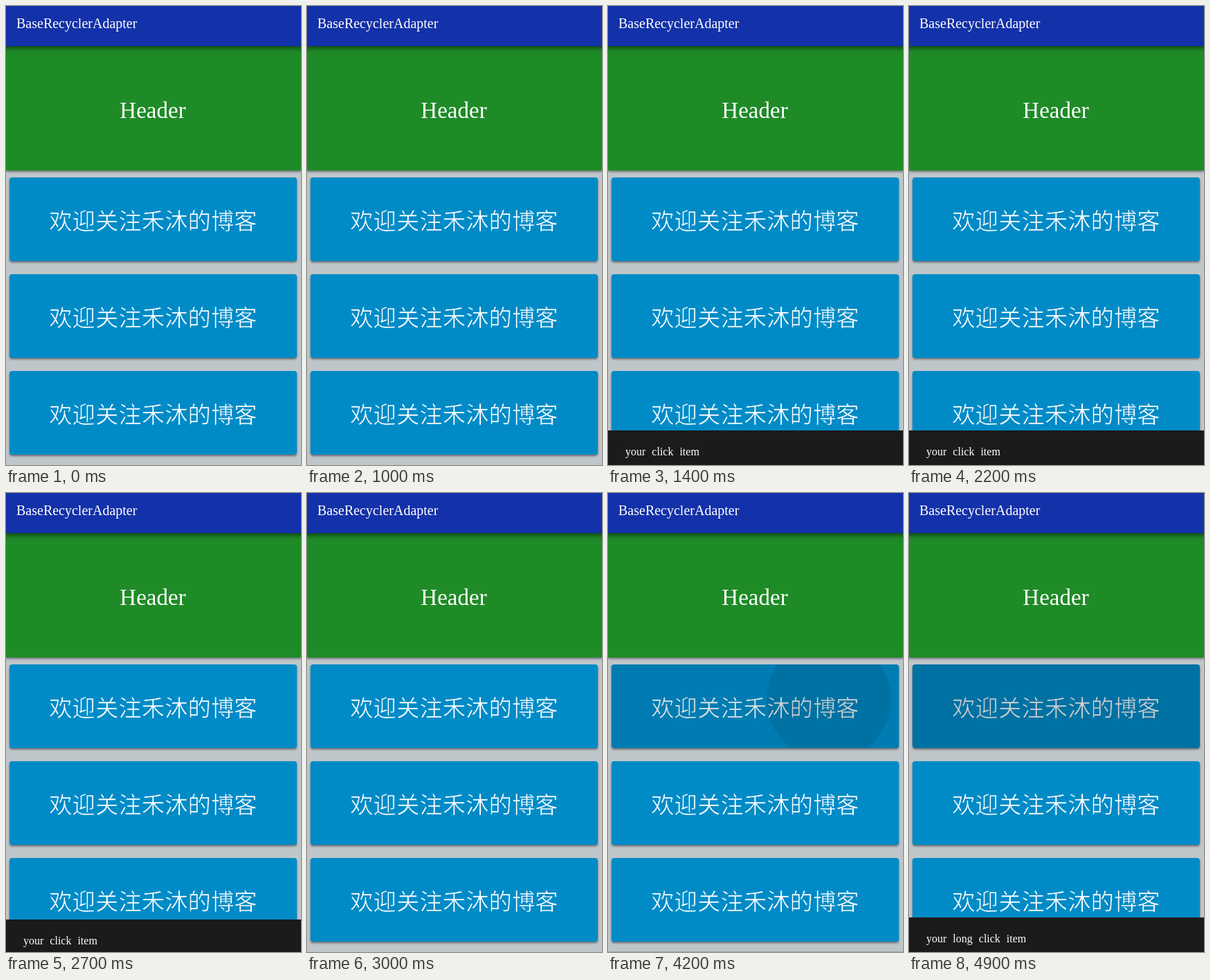
Animation of 426x664 px, one loop 5100 ms. Source, as an HTML page:

```html
<!DOCTYPE html>
<html lang="zh">
<head>
<meta charset="utf-8">
<style>
  html, body { margin: 0; height: 100%; overflow: hidden; background: #bfc6ca; }
  svg { display: block; width: 426px; height: 664px; }
  text { fill: #fff; font: 20px "Liberation Serif", "Noto Serif", serif; }
  .head { font-size: 33px; text-anchor: middle; }
  .card { fill: #008bc7; filter: drop-shadow(0 2px 1.5px #0007); }
  /* The card-coloured stroke thins the glyphs */
  .greet { font: 300 33.4px "Noto Sans CJK SC", "Noto Sans CJK", sans-serif; text-anchor: middle; stroke: #008bc7; stroke-width: .7px; }
  .bar { filter: drop-shadow(0 3px 3px #0008); }
  .panel { filter: drop-shadow(0 2px 1.5px #0006); }
  #msg { font-size: 16px; word-spacing: 5px; }
</style>
</head>
<body>
<svg viewBox="0 0 426 664">
  <clipPath id="clip"><rect x="5" y="248" width="415" height="121" rx="4"/></clipPath>
  <rect width="426" height="664" fill="#bfc6ca"/>
  <rect class="panel" y="50" width="426" height="188" fill="#1f8b27"/>
  <text class="head" x="212" y="162">Header</text>
  <rect class="bar" x="-8" y="-8" width="442" height="66" fill="#1331a8"/>
  <text x="15" y="32">BaseRecyclerAdapter</text>
  <g id="cards"></g>
  <g clip-path="url(#clip)">
    <rect id="shade" y="240" width="426" height="140"/>
    <circle id="ripple"/>
  </g>
  <g id="snack">
    <rect y="614" width="426" height="50" fill="#1b1b1b"/>
    <text id="msg" x="25" y="650"></text>
  </g>
</svg>
<script>
const LOOP = 5100, STEP = 100;
const $ = id => document.getElementById(id);
const set = (el, attrs) => { for (const k in attrs) el.setAttribute(k, attrs[k]); };
const part = (t, start, length) => Math.min(1, Math.max(0, (t - start) / length));
const mix = (a, b, p) => a + (b - a) * p;

// cubic-bezier(.4, 0, .2, 1)
function ease(x) {
  let lo = 0, hi = 1;
  for (let i = 0; i < 20; i++) {
    const s = (lo + hi) / 2, r = 1 - s;
    if (1.2 * r * r * s + .6 * r * s * s + s ** 3 < x) lo = s; else hi = s;
  }
  return 3 * (1 - lo) * lo * lo + lo ** 3;
}

$('cards').innerHTML = [248, 388, 528].map(y =>
  `<rect class="card" x="5" y="${y}" width="415" height="121" rx="4"/>
   <text class="greet" x="212.5" y="${y + 75}">欢迎关注禾沐的博客</text>`).join('');

function draw(t) {
  const long = t >= 3600;
  const shown = long ? ease(part(t, 4190, 250))
                     : ease(part(t, 1140, 250)) - ease(part(t, 2664, 250));
  $('msg').textContent = long ? 'your long click item' : 'your click item';
  set($('snack'), { transform: `translate(0 ${50 * (1 - shown)})` });

  // The ripple grows from the touch point while drifting to the card's centre
  const grow = part(t, 3708, 1190);
  set($('shade'), { opacity: .105 * part(t, 3700, 380) });
  set($('ripple'), {
    cx: mix(394, 212, grow), cy: mix(291, 309, grow),
    r: 217 * grow, opacity: .085 * part(t, 3700, 120)
  });
}

function tick(now) {
  draw(Math.floor(now % LOOP / STEP) * STEP);
  requestAnimationFrame(tick);
}
tick(performance.now());
</script>
</body>
</html>
```
